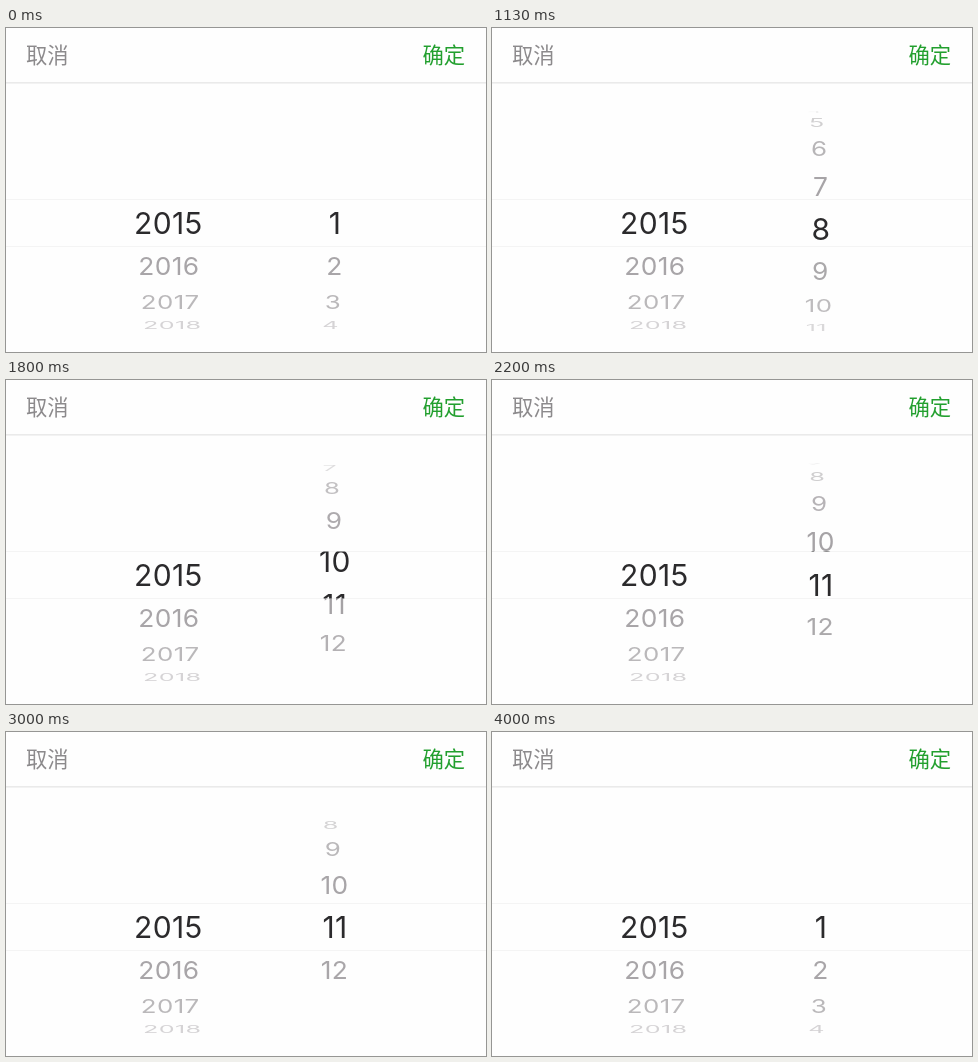
An HTML page with a canvas for the animation above (4.07 s loop, 480 px wide and 324 px high).

```html
<!DOCTYPE html>
<html lang="zh-CN">
<head>
<meta charset="utf-8">
<title>Month picker</title>
<style>
  html, body { margin: 0; width: 100%; height: 100%; overflow: hidden; background: #fefefe; }
  canvas { display: block; width: 480px; height: 324px; }
</style>
</head>
<body>
<canvas id="stage"></canvas>
<script>
const W = 480, H = 324, LOOP = 4070;
const MID = 195.2, RADIUS = 111, STEP = Math.PI / 8;
const BAND = { top: 171.5, bottom: 218.5 };
const YEARS = ['2015', '2016', '2017', '2018'];
const MONTHS = Array.from({ length: 12 }, (_, i) => String(i + 1));

// [ms, index of the month under the band]
const KEYS = [
  [400, 0], [560, 1.1], [730, 3.09], [930, 5.3], [1130, 6.85], [1450, 8.4],
  [1800, 9.31], [2200, 9.78], [2670, 10], [2990, 10], [3130, 9.1],
  [3270, 7], [3470, 2.9], [3600, 0.3], [3730, -0.3], [4000, 0]
];

const canvas = document.getElementById('stage');
const ctx = canvas.getContext('2d');
const dpr = window.devicePixelRatio || 1;
canvas.width = W * dpr;
canvas.height = H * dpr;

const slope = i => (KEYS[i + 1][1] - KEYS[i][1]) / (KEYS[i + 1][0] - KEYS[i][0]);

// Harmonic mean of neighbouring slopes keeps the curve free of overshoot.
function tangent(i) {
  if (i === 0 || i === KEYS.length - 1) return 0;
  const a = slope(i - 1), b = slope(i);
  return a * b > 0 ? 2 * a * b / (a + b) : 0;
}

function monthAt(t) {
  const n = KEYS.length - 1;
  if (t <= KEYS[0][0]) return KEYS[0][1];
  if (t >= KEYS[n][0]) return KEYS[n][1];
  const i = KEYS.findIndex(k => k[0] > t) - 1;
  const [t0, p0] = KEYS[i], [t1, p1] = KEYS[i + 1];
  const d = t1 - t0, u = (t - t0) / d, v = 1 - u;
  return p0 * v * v * (1 + 2 * u) + p1 * u * u * (3 - 2 * u)
    + d * u * v * (tangent(i) * v - tangent(i + 1) * u);
}

function drawWheel(items, x, pos, size, color, fade) {
  ctx.font = `400 ${size}px Inter, Roboto, sans-serif`;
  ctx.letterSpacing = '0.4px';
  ctx.textAlign = 'center';
  ctx.textBaseline = 'alphabetic';
  ctx.fillStyle = color;
  items.forEach((label, i) => {
    const angle = (i - pos) * STEP;
    if (Math.abs(angle) >= Math.PI / 2) return;
    const c = Math.cos(angle);
    const depth = 1 - 0.08 * (1 - c);
    ctx.save();
    ctx.globalAlpha = fade ? 0.1 + 0.9 * c : 1;
    ctx.translate(W / 2 + (x - W / 2) * depth, MID + RADIUS * Math.sin(angle));
    ctx.scale(depth, c);
    ctx.fillText(label, 0, size * 0.3635);
    ctx.restore();
  });
}

function drawColumns(pos, size, color, fade, clips) {
  ctx.save();
  ctx.beginPath();
  for (const [top, bottom] of clips) ctx.rect(0, top, W, bottom - top);
  ctx.clip();
  drawWheel(YEARS, 162.4, 0, size, color, fade);
  drawWheel(MONTHS, 329, pos, size, color, fade);
  ctx.restore();
}

function rule(y, color) {
  ctx.fillStyle = color;
  ctx.fillRect(0, y, W, 1);
}

function button(label, x, align, color) {
  ctx.font = '400 21.3px "Noto Sans CJK SC", "Noto Sans CJK", sans-serif';
  ctx.letterSpacing = '0px';
  ctx.textAlign = align;
  ctx.textBaseline = 'alphabetic';
  ctx.fillStyle = color;
  ctx.fillText(label, x, 35.4);
}

function draw(t) {
  const pos = monthAt(t);
  ctx.setTransform(dpr, 0, 0, dpr, 0, 0);
  ctx.fillStyle = '#fefefe';
  ctx.fillRect(0, 0, W, H);

  button('取消', 20, 'left', '#8c8a8c');
  button('确定', 459, 'right', '#229f2e');
  rule(54.4, '#dedede');
  rule(171, '#f4f4f4');
  rule(218, '#f4f4f4');

  drawColumns(pos, 26.5, '#a29fa2', true, [[55, BAND.top], [BAND.bottom, H]]);
  drawColumns(pos, 30, '#2b2a2c', false, [[BAND.top, BAND.bottom]]);
}

const start = performance.now();
function frame() {
  draw((performance.now() - start) % LOOP);
  requestAnimationFrame(frame);
}
frame();
</script>
</body>
</html>
```
